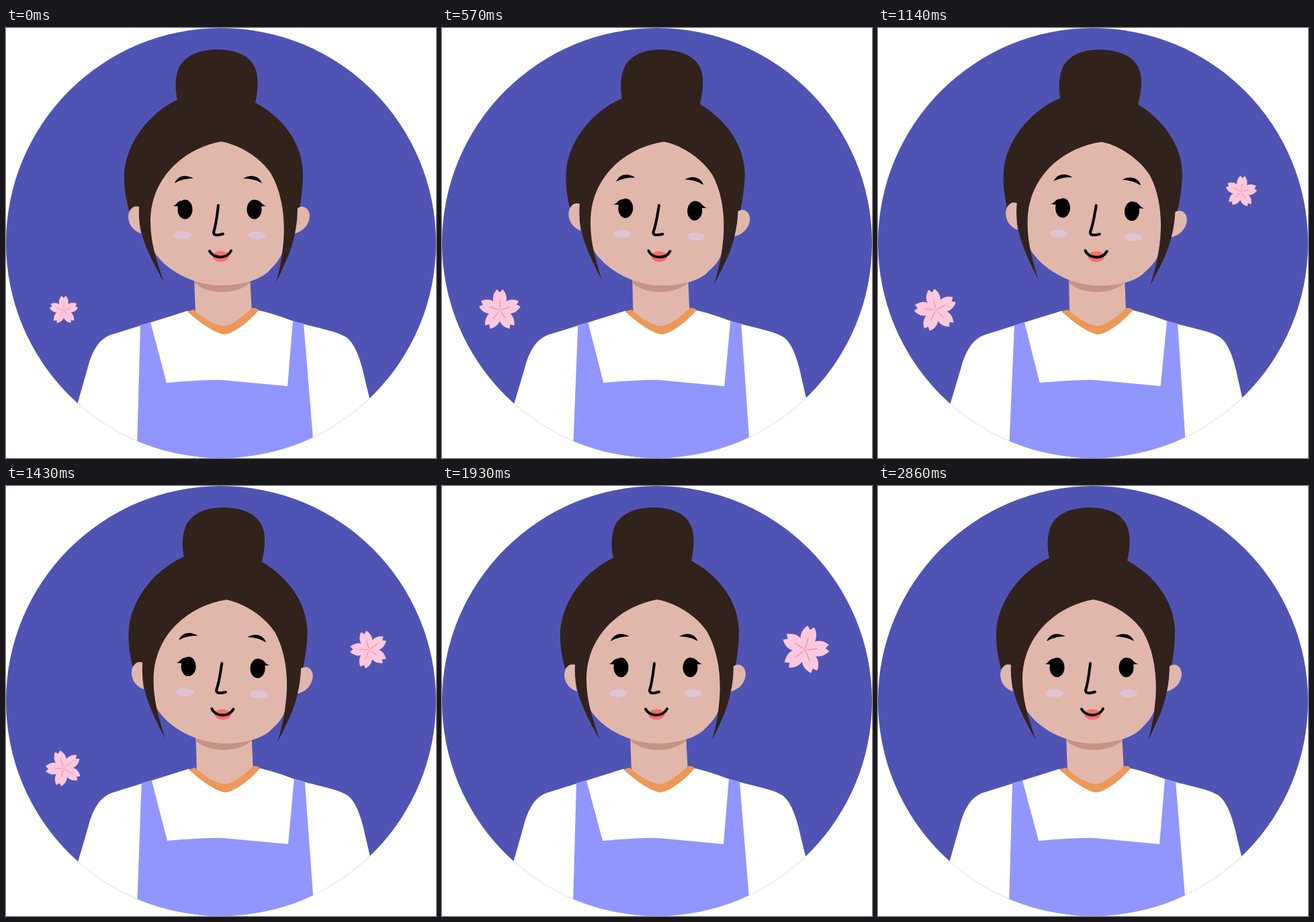
An HTML page that plays this animation: 640 px wide and 640 px high, repeating every 4.78 s.

```html
<!DOCTYPE html>
<html lang="en">
<head>
<meta charset="utf-8">
<title>Portrait with blossoms</title>
<style>
html, body { margin: 0; width: 100%; height: 100%; overflow: hidden; background: #fff; }
svg { display: block; width: 100vw; height: 100vh; }
.line { fill: none; stroke: #000; stroke-width: 4; stroke-linecap: round; stroke-linejoin: round; }
</style>
</head>
<body>
<svg viewBox="0 0 640 640">
  <defs>
    <clipPath id="disc"><circle cx="320" cy="320" r="320"/></clipPath>
    <g id="petal">
      <path fill="#ffc8dc" d="M0 3C-30 -22 -50 -62 -15 -101L-1 -86L13 -101C48 -62 30 -22 0 3Z"/>
      <path fill="none" stroke="#ee6f98" stroke-width="2.6" d="M0 -9V-52"/>
    </g>
    <g id="flower">
      <use href="#petal"/>
      <use href="#petal" transform="rotate(72)"/>
      <use href="#petal" transform="rotate(144)"/>
      <use href="#petal" transform="rotate(216)"/>
      <use href="#petal" transform="rotate(288)"/>
      <circle r="5" fill="none" stroke="#ee6f98" stroke-width="1.5"/>
    </g>
  </defs>
  <circle cx="320" cy="320" r="320" fill="#4f54b4"/>
  <g clip-path="url(#disc)">
    <g id="body">
      <path fill="#fff" d="M270 421L155 457C138 464 128 480 121 508L107 557L80 660H570L541 551L533 518C527 490 518 468 506 460C490 450 455 445 427 436C405 428 390 423 375 420L323 455Z"/>
      <path fill="#e1b7ac" d="M280 370L282 425Q325 468 366 425L363 370Z"/>
      <path fill="#c69385" d="M280 360H363V379C345 397 300 398 280 379Z"/>
      <path fill="#ec9858" d="M270 422L279 419C300 438 318 444 325 443.5C335 443 350 432 366 417Q373 416 376 420C360 440 335 456 325 456C312 455 290 440 270 422Z"/>
      <path fill="#9196ff" d="M200 442L215 438L239 528Q300 523 322 524L419 533L427 436L443 440L457 612L458 660H194Z"/>
    </g>
    <g id="head">
      <path fill="#e1b7ac" d="M320 160C240 160 210 230 212 290C213 310 217 325 221 334C240 362 280 383 320 383C350 383 375 376 390 363C398 354 406 348 411 335C416 300 425 165 320 160Z"/>
      <path fill="#32221c" d="M255 107C215 125 176 172 176 222C176 245 180 258 183 272L197 266C198 300 203 322 235 378C222 340 215 318 215 285C216 225 262 180 320 169C350 174 380 195 394 216C408 240 414 270 414 305C413 335 407 360 402 379C420 340 432 320 434 268L437 268C440 250 442 235 442 215C441 170 410 132 371 111C376 90 376 70 370 58C362 40 340 32 314 32C288 32 266 41 257 60C252 72 251 90 255 107Z"/>
      <path fill="#e1b7ac" d="M198 266C188 263 182 272 182 282C183 294 190 302 201 306Q197 285 198 266ZM434 268C444 262 452 270 452 280C451 293 443 302 430 306Q434 288 434 268Z"/>
      <path d="M251 231C256 218 270 218 279 224C268 224 260 226 251 231ZM381 231C376 218 362 218 353 224C364 224 372 226 381 231ZM248 265C254 264 254 258 261 257L262 266ZM388 265C381 264 381 259 374 256L372 266Z"/>
      <ellipse cx="266.5" cy="270" rx="11" ry="14.5"/>
      <ellipse cx="369.5" cy="270" rx="11" ry="14.5"/>
      <g fill="#dfc4d6">
        <ellipse cx="262.5" cy="308.5" rx="13" ry="6"/>
        <ellipse cx="373" cy="308.5" rx="13" ry="6"/>
      </g>
      <ellipse cx="319.5" cy="340" rx="12" ry="8" fill="#f9706a"/>
      <path class="line" d="M316 264C314 280 313 292 309 304C309 309 314 309 323 306.5M303 332C309 344 329 344 335 331.5"/>
    </g>
    <use id="left" href="#flower"/>
    <use id="right" href="#flower"/>
  </g>
</svg>
<script>
const LOOP = 4780, FPS = 14, LAST = 40;
const el = id => document.getElementById(id);

// A blossom grows and spins until its peak, then retraces both.
function bloom(id, x, y, peak, tilt, t) {
  const d = Math.abs(t - peak);
  const size = (35.8 - 0.0165 * d) / 100;
  const turn = 0.255 * Math.min(d, 500) + 0.06 * Math.max(d - 500, 0) + tilt;
  el(id).setAttribute('transform', `translate(${x} ${y}) rotate(${turn}) scale(${size})`);
  el(id).style.display = d < 890 ? '' : 'none';
}

function draw(now) {
  const step = Math.min(LAST, Math.floor((now % LOOP + 5) * FPS / 1000));
  const t = step * 1000 / FPS;
  const sway = Math.max(0, 1 - Math.abs(t - 930) / 930);
  el('head').setAttribute('transform', `rotate(${3.5 * sway} 318 450)`);
  el('body').setAttribute('transform', `translate(0 640) skewX(${-1.1 * sway}) translate(0 -640)`);
  bloom('left', 86, 420, 880, -6, t);
  bloom('right', 540.5, 243.5, 1900, 7.4, t);
}

const start = performance.now();
function tick() {
  draw(performance.now() - start);
  requestAnimationFrame(tick);
}
tick();
</script>
</body>
</html>
```
